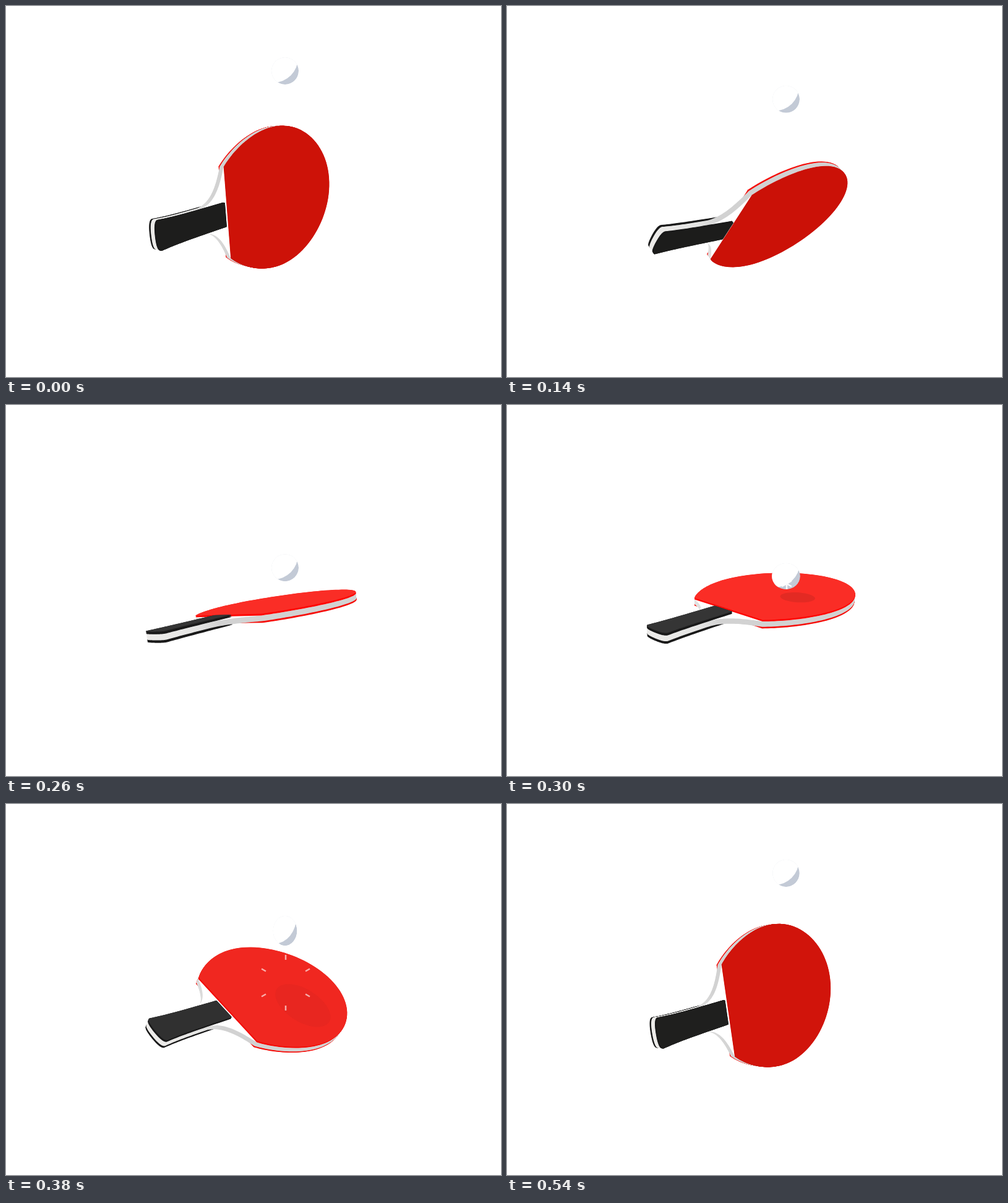
These frames come from a looping animation (800 by 600 pixels, 560 ms). An HTML page with a canvas:

```html
<!DOCTYPE html>
<html lang="en">
<head>
<meta charset="utf-8">
<title>Table tennis</title>
<style>
  html, body { margin: 0; width: 100%; height: 100%; overflow: hidden; background: #fff; }
  canvas { display: block; width: 800px; height: 600px; }
</style>
</head>
<body>
<canvas id="stage" width="800" height="600"></canvas>
<script>
const ctx = document.getElementById('stage').getContext('2d');
const LOOP = 560, STEP = 20, HIT = 300;
const DEPTH = 800;                    // camera distance
const TILT_COS = 0.728, TILT_SIN = 0.685;
const { sin, cos, exp, max, min, PI } = Math;
const rad = d => d * PI / 180;
const clamp = x => max(0, min(1, x));
const mix = (a, b, k) => `rgb(${a.map((c, i) => Math.round(c + (b[i] - c) * k))})`;

// Samples a chain of cubics for one half (along, across) and mirrors it.
function outline(start, ...curves) {
  const half = [start];
  let a = start;
  for (const [b, c, d] of curves) {
    for (let i = 1; i <= 24; i++) {
      const t = i / 24, w = 1 - t;
      half.push([0, 1].map(k =>
        w * w * w * a[k] + 3 * w * w * t * b[k] + 3 * w * t * t * c[k] + t * t * t * d[k]));
    }
    a = d;
  }
  return half.concat(half.map(([s, v]) => [s, -v]).reverse());
}
const line = (a, b) => [a, b, b];
const circle = (s, v, r) => Array.from({ length: 48 }, (_, i) =>
  [s + r * cos(i * PI / 24), v + r * sin(i * PI / 24)]);

const blade = [
  [[24, 98], [75, 126], [135, 126]],
  [[218, 126], [294, 70], [294, 0]]
];
const endCap = [[-147, 10], [-146, 22.5], [-140, 22.5]];
const wood = outline([-147, 0], endCap, [[-115, 20], [-85, 20], [-55, 20]],
  [[-24, 23.5], [-11, 50], [0, 76]], ...blade);
const rubber = outline([0, 76], ...blade);
const grip = outline([-147, 0], endCap, [[-110, 20], [-80, 20], [-8, 20]], line([-7, 20], [-7, 18]));

function pose(t) {
  const dip = t < HIT ? sin(PI * (t / HIT) ** 1.2) : 0;
  const swing = 5.5 * sin(2 * PI * t / LOOP) + 4.5 * dip;
  let roll = 161.4 - 180 * t / LOOP + swing;
  if (roll > 90) roll -= 180;
  const a = rad(-17.5 + 7.5 * dip), r = rad(roll);
  const x = cos(a), y = sin(a), c = cos(r), s = sin(r);
  const base = [241, 371 + 8 * dip];
  return {
    axis: [TILT_COS * x, TILT_COS * y, -TILT_SIN],
    side: [-c * y + s * TILT_SIN * x, c * x + s * TILT_SIN * y, s * TILT_COS],
    normal: [s * y + c * TILT_SIN * x, -s * x + c * TILT_SIN * y, c * TILT_COS],
    base,
    neck: [base[0] + 119 * x, base[1] + 119 * y]
  };
}

// Perspective path of a flat shape at height h above the middle of the paddle.
function project(p, shape, h) {
  const path = new Path2D();
  for (const [s, v] of shape) {
    const [x, y, z] = [0, 1, 2].map(i => s * p.axis[i] + v * p.side[i] + h * p.normal[i]);
    const k = DEPTH / (DEPTH - z);
    path.lineTo(p.neck[0] + k * x, p.neck[1] + k * y);
  }
  path.closePath();
  return path;
}

function slab(p, shape, from, to, rim, face) {
  ctx.fillStyle = rim;
  for (let h = from; h < to; h += 0.6) ctx.fill(project(p, shape, h));
  const top = project(p, shape, to);
  ctx.fillStyle = face || rim;
  ctx.fill(top);
  return top;
}

function drawShadow(p, face, age) {
  if (age < 0) return;
  const grow = age / 80;
  ctx.save();
  ctx.clip(face);
  ctx.fillStyle = `rgba(60,20,20,${0.12 * clamp(1 - age / 240) / (1 + 0.7 * grow)})`;
  ctx.fill(project(p, circle(135 + 25 * grow, 42, 30 + 25 * grow), 7));
  ctx.restore();
}

function drawPaddle(t) {
  const p = pose(t);
  const lit = clamp((0.15 - p.normal[1]) / 1.08);
  const red = [203, 17, 7];
  const rim = ctx.createLinearGradient(...p.base, ...p.neck);
  rim.addColorStop(0, '#ecebe9');
  rim.addColorStop(0.6, '#e4e4e3');
  rim.addColorStop(0.9, '#d2d2d2');

  slab(p, rubber, -7, -4.3, '#f5100c');
  slab(p, grip, -8, -4.3, '#1a1a1a');
  slab(p, wood, -4.3, 4.3, rim, '#fff');
  const face = slab(p, rubber, 4.3, 7, mix(red, [255, 8, 5], lit), mix(red, [250, 45, 38], lit));
  drawShadow(p, face, t - HIT);
  slab(p, grip, 4.3, 8, '#1a1a1a', mix([28, 28, 27], [53, 53, 53], lit));
}

function drawBall(t) {
  const left = LOOP - t, age = t - HIT;
  const y = 105 + min(0.00234 * t * t, 0.318 * left + 0.00132 * left * left);
  const pull = age < 0 ? 0 : (age / 80 * exp(1 - age / 80)) ** 3 - 0.35 * exp(-age / 20);
  ctx.save();
  ctx.translate(451, y);
  ctx.scale(1 - 0.12 * pull, 1 + 0.1 * pull);
  ctx.beginPath();
  ctx.arc(0, 0, 22, 0, 2 * PI);
  ctx.clip();
  ctx.fillStyle = '#c3cad6';
  ctx.fill();
  ctx.fillStyle = '#fff';
  ctx.beginPath();
  ctx.arc(-19, -21, 40, 0, 2 * PI);
  ctx.fill();
  ctx.restore();
}

function drawSparks(age) {
  if (age < 0 || age > 120) return;
  const far = 5 + 0.45 * age, near = max(0, far - 4);
  ctx.strokeStyle = `rgba(255,255,255,${0.95 * (1 - (age / 120) ** 2.6)})`;
  ctx.lineWidth = 2.5;
  ctx.beginPath();
  for (let a = PI / 6; a < 2 * PI; a += PI / 3) {
    ctx.moveTo(452 + near * cos(a), 289 + near * sin(a));
    ctx.lineTo(452 + (far + 4) * cos(a), 289 + (far + 4) * sin(a));
  }
  ctx.stroke();
}

function draw(now) {
  const t = Math.floor((now % LOOP) / STEP) * STEP;
  ctx.clearRect(0, 0, 800, 600);
  drawPaddle(t);
  drawBall(t);
  drawSparks(t - HIT);
}

const start = performance.now();
function tick() {
  draw(performance.now() - start);
  requestAnimationFrame(tick);
}
tick();
</script>
</body>
</html>
```
